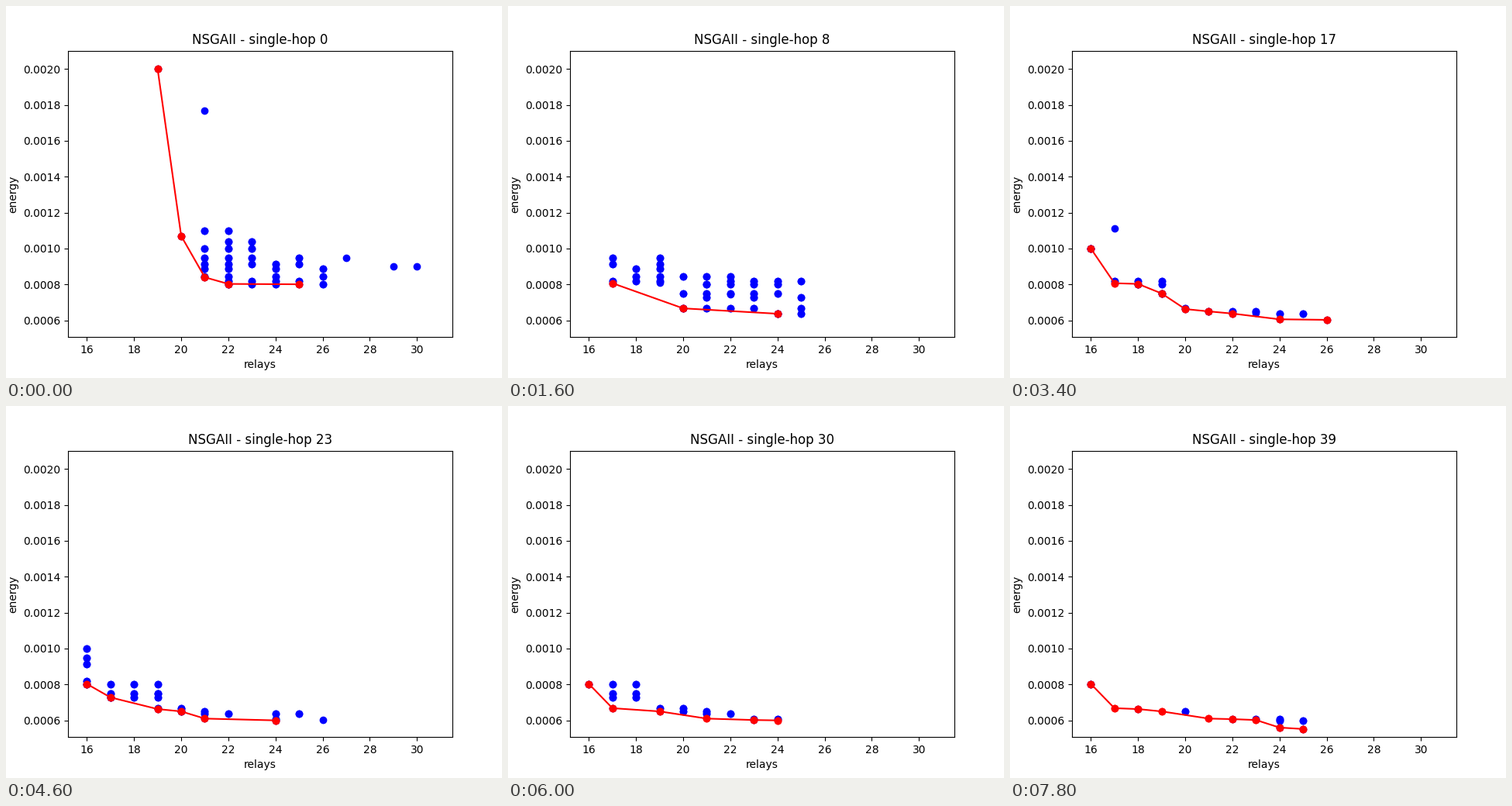
Animation, 640 px wide and 480 px high, one loop 8000 ms. Source, as a matplotlib script:

```python
import math
import random
from itertools import product

import matplotlib.pyplot as plt
from matplotlib.animation import FuncAnimation

GENERATIONS = 40
UNIT = 1e-4    # energies below are given in this unit
LIFETIME = 6   # generations a beaten solution stays in the population
LAG = 8        # the population trails the front by this many generations

# Notable solutions: (generation found, relays, energy)
FINDS = [
    (0, 19, 20), (0, 20, 10.7), (0, 21, 8.4), (0, 22, 8.03), (0, 25, 8.01),
    (1, 18, 12), (2, 22, 7.45), (3, 19, 8.1), (3, 21, 8.02), (4, 24, 6.37),
    (7, 20, 6.67), (8, 17, 8.07), (9, 21, 6.5), (10, 19, 8.03), (11, 23, 6.4),
    (13, 16, 10), (14, 22, 6.38), (15, 18, 8.03), (16, 24, 6.06),
    (17, 26, 6.03), (17, 19, 7.5), (17, 20, 6.63),
    (20, 16, 8.03), (21, 19, 6.63), (22, 24, 6),
    (23, 17, 7.28), (23, 20, 6.5), (23, 21, 6.1),
    (26, 23, 6.02), (28, 19, 6.5), (30, 17, 6.68),
    (33, 24, 5.6), (35, 25, 5.52), (37, 18, 6.63), (38, 22, 6.07),
    # strays far from the front
    (-3, 21, 17.7), (-3, 27, 9.5), (-3, 29, 9), (-3, 30, 9), (14, 17, 11.1),
]

# Energies that recur, each reached by a random choice of relay counts
LEVELS = [12, 11, 10.4, 10, 9.5, 9.12, 8.87, 8.45, 8.17, 8.03,
          7.5, 7.3, 6.67, 6.5, 6.37, 6.05, 5.98]
rng = random.Random(4)
COMMON = [p for p in product(range(16, 27), LEVELS) if rng.random() < 0.8]


def best(relays, gen):
    """Lowest energy found by a generation with at most this many relays."""
    return min((e for born, x, e in FINDS if born <= max(gen, 0) and x <= relays),
               default=math.inf)


def pareto(gen):
    """Unbeaten solutions, ordered by relays."""
    return [(x, best(x, gen)) for x in range(16, 31)
            if best(x, gen) < best(x - 1, gen)]


def ceiling(relays, gen):
    """Highest energy still common: the older front plus a shrinking margin."""
    low, past = best(relays, gen), best(relays, gen - LAG)
    if past == math.inf:
        past = low
    margin = 0.05 + 4 * math.exp((21 - relays) / 4 - gen / 4)
    return min(past + margin, low + max(2, 4 - gen))


def population(gen):
    first, last = max(16, 21 - gen // 2), 26 if gen < 6 else 25
    crowd = [(x, e) for x, e in COMMON if first <= x <= last
             and best(x, gen) <= e <= ceiling(x, gen)]
    recent = [(x, e) for born, x, e in FINDS if born <= gen <= born + LIFETIME]
    return 2 * crowd + recent  # common solutions occur more than once


fig, ax = plt.subplots(figsize=(6.4, 4.8), dpi=100)
ax.set(xlim=(15.2, 31.5), ylim=(5.07 * UNIT, 21.02 * UNIT),
       xlabel="relays", ylabel="energy")
dots, = ax.plot([], [], "o", color="blue")
line, = ax.plot([], [], "-", color="red")
marks, = ax.plot([], [], "o", color="red")
title = ax.set_title("")


def place(artist, points):
    artist.set_data([x for x, _ in points], [e * UNIT for _, e in points])


def draw(gen):
    front = pareto(gen)
    place(dots, population(gen))
    place(line, front)
    place(marks, 2 * front)
    title.set_text(f"NSGAII - single-hop {gen}")
    return dots, line, marks, title


anim = FuncAnimation(fig, draw, frames=GENERATIONS, interval=200,
                     init_func=lambda: draw(0), repeat=True, repeat_delay=0)
plt.show()
```
